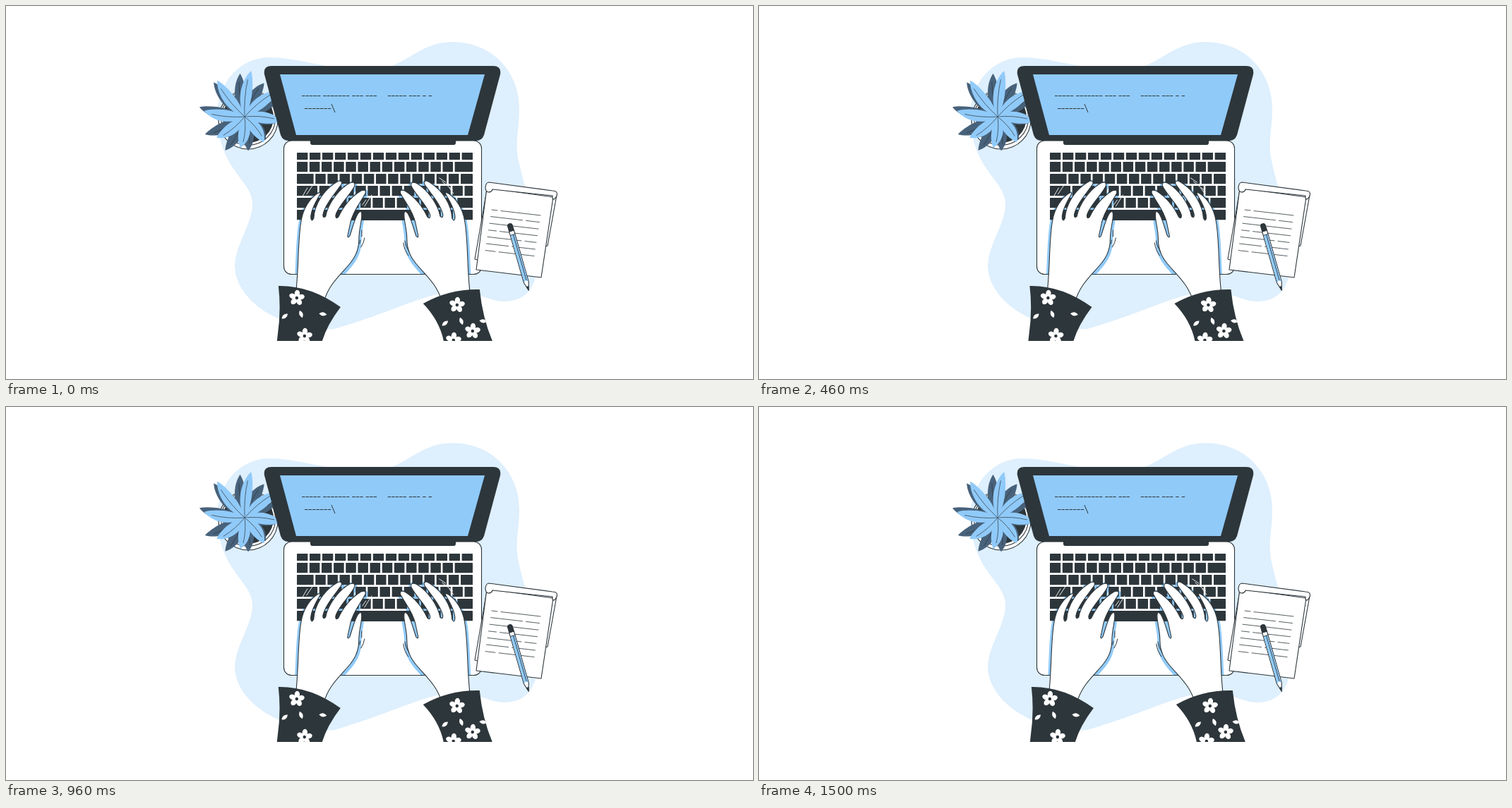
Write an HTML page that moves like this. It is 1058 px wide and 529 px high and loops after 1540 ms.

```html
<!DOCTYPE html>
<html lang="en">
<head>
<meta charset="utf-8">
<title>Typing</title>
<style>
  html, body { margin: 0; height: 100%; overflow: hidden; background: #fff; }
  svg { display: block; width: 100%; height: 100%; }
  .ink { fill: #2d363b; }
  .paper { fill: #fff; stroke: #2d363b; stroke-width: 1.1; stroke-linejoin: round; }
  .blue { fill: #90caf9; }
  .line { fill: none; stroke: #2d363b; stroke-linecap: round; }
  .glow { fill: none; stroke: #fff; stroke-width: .9; stroke-linecap: round; }
</style>
</head>
<body>
<svg viewBox="0 0 1058 529">
  <defs>
    <path id="hand" d="M410 412 C415 378 413 335 418 306 C421 285 432 272 441 266 Q446 263 445 267
      C439 277 431 291 432 301 Q433 307 436 301 C437 281 450 261 468 250 C474 246 477 249 475 253
      C468 264 452 281 449 296 Q449 302 453 298 C456 281 471 260 487 251 Q495 248 494 255
      C488 268 470 284 467 297 Q467 303 471 299 C478 284 490 270 503 262 Q511 259 509 266
      C502 279 492 290 488 307 L484 326 Q484 330 487 326 C490 318 494 301 499 294 Q504 288 504 296
      C504 307 500 316 500 331 C500 348 493 359 484 369 C471 384 457 396 450 420 Z"/>
    <g id="pair">
      <use href="#hand"/>
      <use href="#hand" transform="matrix(-1 0 0 1 1068 0)"/>
    </g>
    <g id="flower">
      <g id="petals" fill="#fff"></g>
      <circle r="2.2" class="ink"/>
    </g>
    <path id="bud" fill="#fff" d="M-5.5 0 Q0 -5.5 5.5 0 Q0 5 -5.5 0Z"/>
    <g id="motif">
      <use href="#flower"/>
      <use href="#bud" transform="translate(-17 26) rotate(-40)"/>
      <use href="#bud" transform="translate(6 23) rotate(70)"/>
      <use href="#bud" transform="translate(37 23) rotate(8)"/>
    </g>
    <path id="cuffs" d="M386 397 Q431 396 474 427 Q455 452 448 475 H384 L385 466 Q390 431 386 397Z
      M591 422 Q628 401 671 402 Q675 442 689 475 H620 Q614 446 591 422Z"/>
    <clipPath id="cloth"><use href="#cuffs"/></clipPath>
    <clipPath id="deck"><rect x="394" y="191" width="279" height="189"/></clipPath>
  </defs>

  <path fill="#deeffd" d="M372 73 C410 73 440 85 490 90 C560 103 575 51 632 51 C690 51 727 95 727 145
    C727 175 721 190 725 215 C732 250 744 280 750 330 C760 385 745 419 705 419 C685 419 670 406 640 405
    C600 404 545 435 465 458 C445 460 405 452 385 443 C345 425 324 395 324 368 C326 335 349 310 349 280
    C347 245 304 235 299 160 C298 105 335 73 372 73Z"/>

  <circle class="paper" cx="343" cy="161" r="42"/>
  <circle class="paper" cx="343" cy="159" r="38.5"/>
  <circle class="ink" cx="343" cy="158" r="36"/>
  <g id="plant"></g>

  <rect class="paper" x="393.5" y="191" width="280" height="189.5" rx="11"/>
  <g clip-path="url(#deck)">
    <g class="blue hands"><use href="#pair" y="2" stroke="#90caf9" stroke-width="7"/></g>
  </g>
  <g id="keys" class="ink"></g>
  <path class="ink" d="M376 85 H690 Q702 85 700 97 L677 183 Q674 191 666 191 H637 V194 Q637 197 634 197
    H434 Q431 197 431 194 V191 H400 Q392 191 389 183 L366 97 Q364 85 376 85Z"/>
  <path class="blue" d="M388 97 H678 L654 183 H411Z"/>
  <path id="code" class="line" style="stroke-linecap:butt"/>

  <path class="paper" d="M682 255 L664 359 L671 361 L767 340 L780 268Z"/>
  <path class="paper" d="M681 258 L666 374 L758 385 L775 271Z"/>
  <path class="paper" d="M684 250 L774 262 Q782 262 780 269 Q777 276 774 273 L774 269 L689 260
    Q688 264 683 264 Q679 263 679 257 Q680 250 684 250Z"/>
  <path id="notes" class="line" stroke-width=".8"/>

  <g transform="translate(714 312) rotate(-16)">
    <path class="paper" d="M-3.500 7 H3.500 V83 L0 95 L-3.500 83Z"/>
    <path class="blue" d="M-3 13 H3 V83 L0 80 L-3 83Z"/>
    <path class="line" stroke-width=".8" d="M-3 13 H3 M1 13 V80"/>
    <path class="ink" d="M-4 8 V0 Q-4 -4 0 -4 Q4 -4 4 0 V8Z M-1.800 89 H1.800 L0 96Z"/>
  </g>

  <g class="hands">
    <use href="#pair" class="paper"/>
    <path class="glow" d="M420 270 L427 258 M426 267 L434 255 M505 282 L510 275 M508 284 L518 268
      M614 244 L623 250 M618 249 L633 261 M628 258 L634 266"/>
    <path class="line" d="M504 318 V327 M508 329 Q507 336 503 342 M502 332 L501 337
      M563 336 Q564 346 570 354 M565 333 Q566 341 571 348"/>
    <use href="#cuffs" class="ink"/>
    <g clip-path="url(#cloth)">
      <use href="#motif" x="412" y="414"/>
      <use href="#motif" x="639" y="424"/>
      <use href="#motif" x="423" y="468"/>
      <use href="#motif" x="661" y="461"/>
      <use href="#motif" x="634" y="474"/>
    </g>
  </g>
</svg>
<script>
const $ = id => document.getElementById(id);
const range = n => [...Array(n).keys()];

// A leaf grows from the middle of the pot, `deg` clockwise from the top
function leaf(deg, len, fill) {
  return `<g transform="translate(338 157) rotate(${deg}) scale(1 ${-len})">
    <path fill="${fill}" d="M0 0 C-15 .3 -13 .75 0 1 C6 .8 9 .3 0 0Z"/>
    <path class="line" stroke-width=".7" vector-effect="non-scaling-stroke" d="M0 0 Q-5 .4 -3 .8"/></g>`;
}
const spread = (deg, lean) => 55 + 11 * Math.cos((deg - lean) * Math.PI / 180);
const fan = (n, from, lean, fill) => range(n).map(i => {
  const deg = from + i * 360 / n;
  return leaf(deg, spread(deg, lean), fill);
}).join('');
$('plant').innerHTML = fan(10, -42, -60, '#48627b') + fan(8, 8, -8, '#90caf9');

// Keyboard: a low top row, then rows whose first key sets the stagger
const key = (x, y, w, h) => `<rect x="${x}" y="${y}" width="${w - 2.6}" height="${h}" rx=".6"/>`;
function row(y, h, first, pitch) {
  const end = 663.6;
  let s = key(412, y, first, h), x = 412 + first;
  for (; end - x > pitch * 1.7; x += pitch) s += key(x, y, pitch, h);
  return s + key(x, y, end - x, h);
}
$('keys').innerHTML = row(208, 10, 17.97, 17.97) + key(489, 289, 92, 15) +
  [17.8, 26.2, 31.7, 38.7, 17.8].map((first, i) => row(221 + 17 * i, 14.3, first, 17.15)).join('');

function dashes(text, x, y) {
  let d = '';
  for (const c of text) {
    if (c === '-') d += `M${x} ${y}h4.5`;
    x += c === '-' ? 5.45 : 2.95;
  }
  return d;
}
$('code').setAttribute('d', dashes('----- ------- --- ---     ----- --- - -', 419, 127.5) +
  dashes('-------', 423, 145.5) + 'M461 139L466 151');

// Handwriting: sloping lines, each broken once
$('notes').setAttribute('d', range(7).map(i => {
  const cut = 8 + i * 37 % 54, rest = 64 - cut;
  return `M${688 - 1.5 * i} ${289 + 9.6 * i}l${cut} ${cut * .115}m5 .6l${rest} ${rest * .115}`;
}).join(''));

$('petals').innerHTML = range(5).map(i =>
  `<ellipse cy="-6.3" rx="3.7" ry="4.9" transform="rotate(${i * 72 + 5})"/>`).join('');

// Hands shake sideways; the motion is held at 24 steps per second
const shake = [0, -1, 2, -4, 4, -4, 4, -4, 2, -1, 0];
const LOOP = 1540, STEP = 1000 / 24, hands = document.querySelectorAll('.hands');
function draw(now) {
  const n = Math.min(36, Math.floor((now % LOOP + 5) / STEP));
  const p = (n + .5) / 36 % 1 * 10, i = Math.floor(p);
  const x = 1.058 * (shake[i] + (shake[i + 1] - shake[i]) * (p - i));
  hands.forEach(g => g.setAttribute('transform', `translate(${x.toFixed(2)} 0)`));
}
const start = performance.now();
function tick() {
  draw(performance.now() - start);
  requestAnimationFrame(tick);
}
draw(0);
requestAnimationFrame(tick);
</script>
</body>
</html>
```
